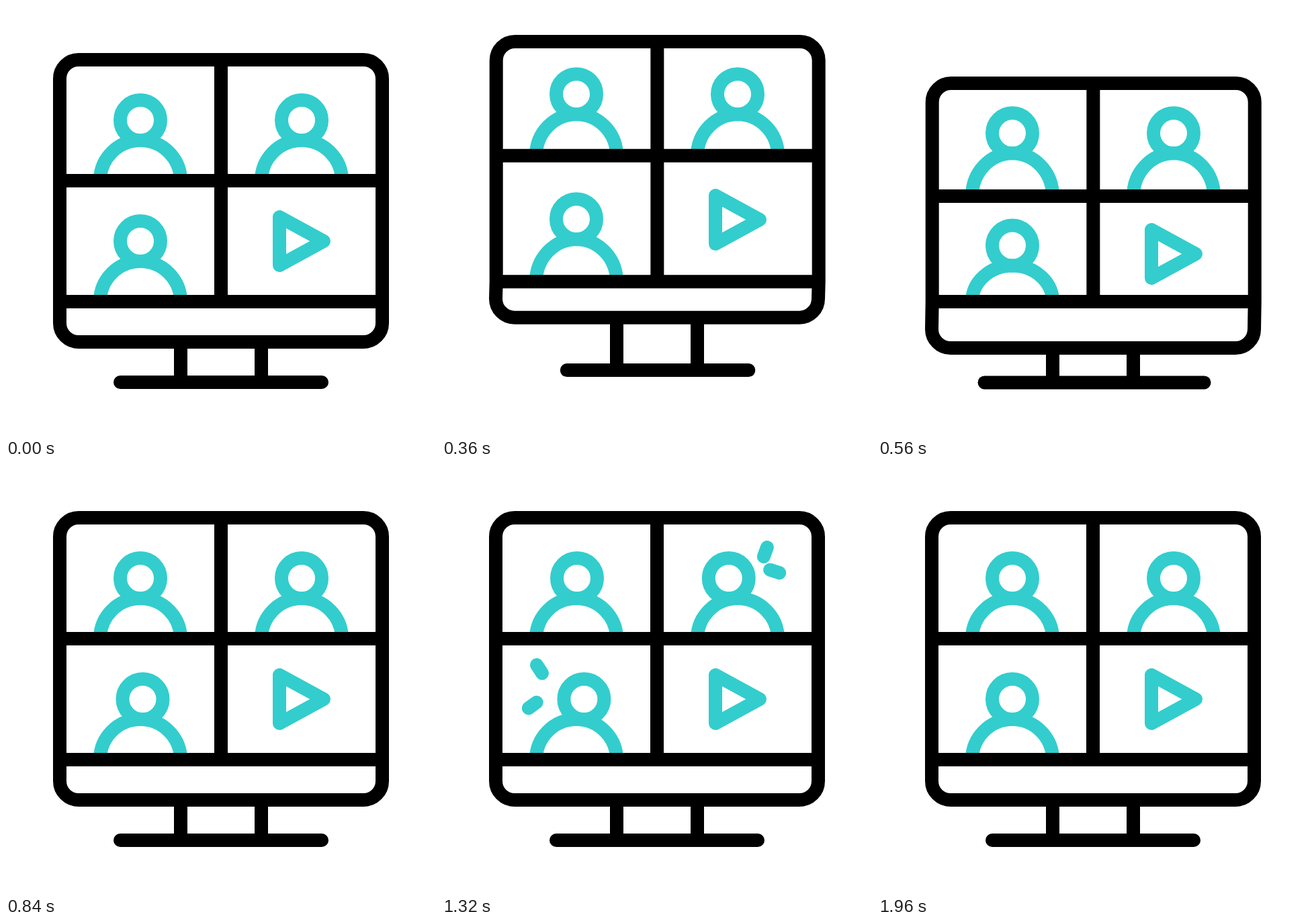
Animation, 640 px wide and 640 px high, one loop 2 s. Source, as an HTML page:

```html
<!DOCTYPE html>
<html lang="en">
<head>
<meta charset="utf-8">
<title>Video meeting</title>
<style>
  html, body { margin: 0; width: 100%; height: 100%; overflow: hidden; background: #fff; }
  svg { display: block; width: 100%; height: 100%; }
  path, circle { fill: none; stroke-width: 20; }
  #people path, #people circle, #play { stroke: #33cdcd; }
  #play { stroke-linejoin: round; }
  #monitor path { stroke: #000; }
  .spark, #base { stroke-linecap: round; }
</style>
</head>
<body>
<svg viewBox="0 0 640 640">
  <g id="people"></g>
  <path id="play" d="M407 -36V36L473 0Z"/>
  <g id="monitor">
    <path id="frame"/>
    <path id="bars"/>
    <path id="legs"/>
    <path id="base"/>
  </g>
</svg>
<script>
const LOOP = 2000, STEP = 40;
const $ = id => document.getElementById(id);
const draw = (el, d) => el.setAttribute('d', d);

// Eased 0..1 progress of t between two times
const ease = (t, from, to) => {
  const p = Math.min(1, Math.max(0, (t - from) / (to - from)));
  return p * p * (3 - 2 * p);
};

// Each part: resting, stretched and squashed position
const POSES = {
  top: [80, 48, 115],
  mid: [260, 218, 283],
  low: [440, 408, 440],
  bottom: [500, 460, 509],
  floor: [560, 540.6, 560.4],
  baseL: [170, 188, 158.5],
  baseR: [470, 454, 485.5],
  lean: [0, 0.7, 0.7],
  headUp: [170, 126.5, 189.3],
  headLow: [350, 314, 356.5],
  play: [350, 314, 369]
};

function poseAt(t) {
  const up = ease(t, 80, 320), down = ease(t, 320, 560), back = ease(t, 560, 800);
  const pose = {};
  for (const [name, [rest, high, squash]] of Object.entries(POSES))
    pose[name] = rest + (high - rest) * up + (squash - high) * down + (rest - squash) * back;
  return pose;
}

// side: direction of the nod; apex and angles (degrees) place the two sparks
const PEOPLE = [
  { x: 200, head: 'headUp', edge: 'mid', start: 1280, side: 1, apex: [170, 150], angles: [254, 164] },
  { x: 440, head: 'headUp', edge: 'mid', start: 1100, side: -1, apex: [473.5, 152.5], angles: [-70, 18.5] },
  { x: 200, head: 'headLow', edge: 'low', start: 760, side: 1, apex: [165.2, 337], angles: [237.5, 144] }
];
const NOD = 13.5, NEAR = 15.5, REACH = 29.5;

function add(tag, cls) {
  const el = document.createElementNS('http://www.w3.org/2000/svg', tag);
  if (cls) el.setAttribute('class', cls);
  return $('people').appendChild(el);
}

for (const p of PEOPLE) {
  p.body = add('path');
  p.face = add('circle');
  p.face.setAttribute('r', 30);
  p.sparks = p.angles.map(() => add('path', 'spark'));
}

function drawPerson(p, pose, t) {
  const y = pose[p.head], edge = pose[p.edge], local = t - p.start;
  draw(p.body, `M${p.x - 60} ${edge}A60 ${edge - y - 30} 0 0 1 ${p.x + 60} ${edge}`);

  const nod = ease(local, 0, 240) - ease(local, 520, 680);
  p.face.setAttribute('cx', p.x + p.side * NOD * nod);
  p.face.setAttribute('cy', y);

  // Sparks grow outwards, then shrink towards their far end
  const from = NEAR + REACH * ease(local, 440, 680);
  const to = NEAR + REACH * ease(local, 100, 340);
  p.sparks.forEach((spark, i) => {
    const a = p.angles[i] * Math.PI / 180;
    const at = r => `${p.apex[0] + r * Math.cos(a)} ${p.apex[1] + r * Math.sin(a)}`;
    draw(spark, to - from > 0.8 ? `M${at(from)}L${at(to)}` : '');
  });
}

function drawMonitor({ top, mid, low, bottom, floor, baseL, baseR, lean }) {
  const l = 80 + lean, r = 560 + lean, c = 320 + lean / 2;
  draw($('frame'), `M${l + 28} ${top}H${r - 28}a28 28 0 0 1 28 28L${r} ${low}L560 ${bottom - 28}` +
    `a28 28 0 0 1 -28 28H108a28 28 0 0 1 -28 -28L${l} ${low}V${top + 28}a28 28 0 0 1 28 -28Z`);
  draw($('bars'), `M80 ${mid}H560M80 ${low}H560M${c} ${top}V${low}`);
  draw($('legs'), `M260 ${bottom}V${floor}M380 ${bottom}V${floor}`);
  draw($('base'), `M${baseL} ${floor}H${baseR}`);
}

function render() {
  const t = Math.floor(performance.now() % LOOP / STEP + 0.05) * STEP % LOOP;
  const pose = poseAt(t);
  PEOPLE.forEach(p => drawPerson(p, pose, t));
  $('play').setAttribute('transform', `translate(0 ${pose.play})`);
  drawMonitor(pose);
  requestAnimationFrame(render);
}
render();
</script>
</body>
</html>
```
